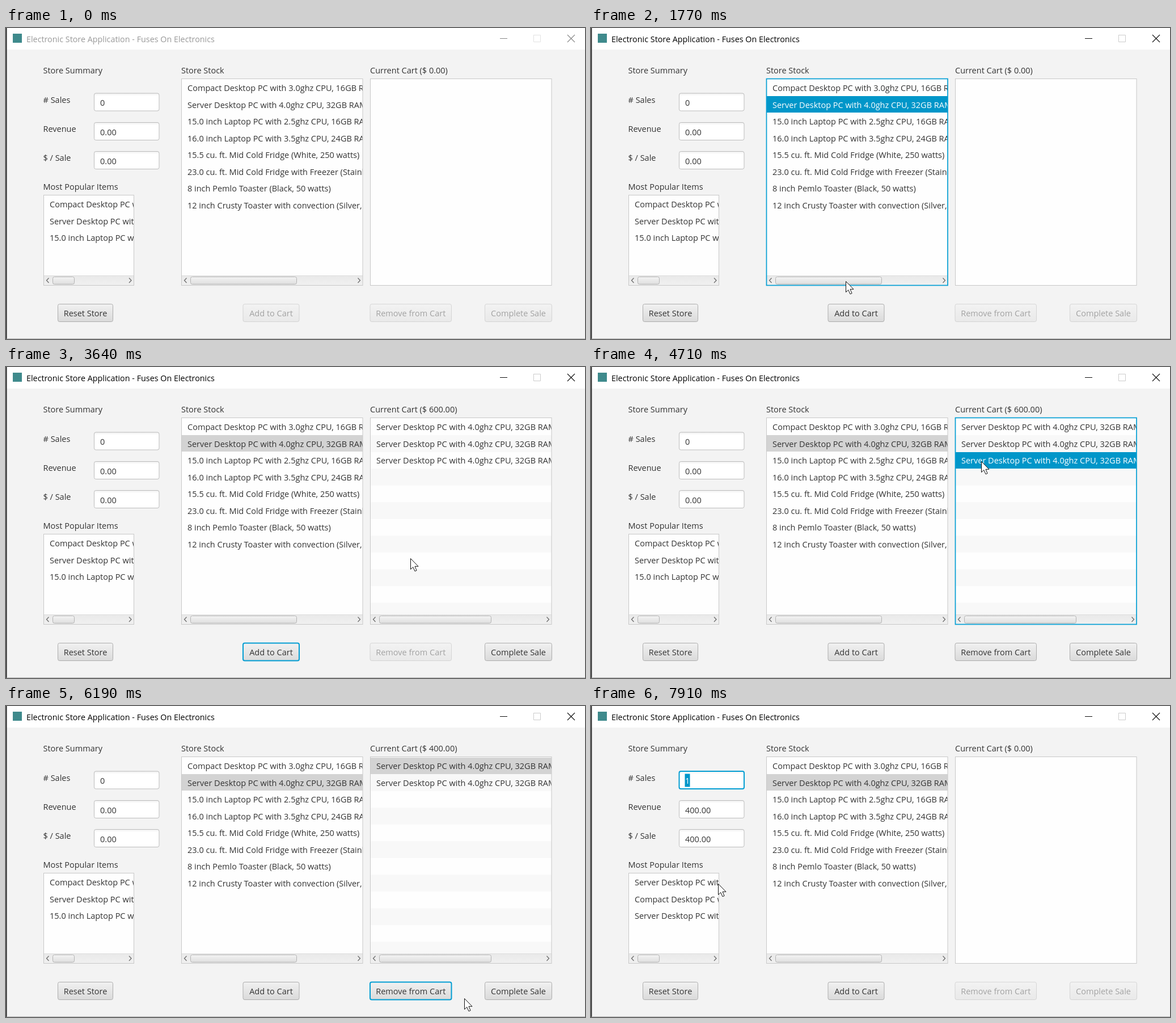
Recreate the animation shown at these times as an HTML page with a canvas. Size 1021 px wide and 548 px high, loop 7990 ms.

```html
<!DOCTYPE html>
<html lang="en">
<head>
<meta charset="utf-8">
<title>Electronic Store</title>
<style>
  html, body { margin: 0; width: 100%; height: 100%; overflow: hidden; background: #f3f3f3; }
  canvas { display: block; }
</style>
</head>
<body>
<canvas id="stage" width="1021" height="548"></canvas>
<script>
const ctx = document.getElementById('stage').getContext('2d');
const LOOP = 7990;
const FONT = '14.5px "Open Sans", "Noto Sans", sans-serif';
const TITLE_FONT = '14.35px "Open Sans", "Noto Sans", sans-serif';
const INK = '#333', BLUE = '#0096c9', FOCUS = '#039ed3';
const ROW = 29.52;

const COMPACT = 'Compact Desktop PC with 3.0ghz CPU, 16GB RAM';
const SERVER = 'Server Desktop PC with 4.0ghz CPU, 32GB RAM';
const LAPTOP = '15.0 inch Laptop PC with 2.5ghz CPU, 16GB RAM';
const STOCK = [
  COMPACT, SERVER, LAPTOP,
  '16.0 inch Laptop PC with 3.5ghz CPU, 24GB RAM',
  '15.5 cu. ft. Mid Cold Fridge (White, 250 watts)',
  '23.0 cu. ft. Mid Cold Fridge with Freezer (Stainless, 125 watts)',
  '8 inch Pemlo Toaster (Black, 50 watts)',
  '12 inch Crusty Toaster with convection (Silver, 50 watts)'
];

const BUTTONS = {
  reset: { label: 'Reset Store', x: 91.5, w: 97 },
  add: { label: 'Add to Cart', x: 418, w: 99 },
  remove: { label: 'Remove from Cart', x: 642, w: 143.5 },
  complete: { label: 'Complete Sale', x: 844.5, w: 118 }
};
const BUTTON_Y = 486.5, BUTTON_H = 31;

// Each entry: time, then the state it changes.
const EVENTS = [
  [1450, { active: true, stockRow: 1, focus: 'stock' }],
  [1530, { canAdd: true }],
  [2300, { focus: 'add', pressed: 'add' }],
  [2370, { pressed: null, items: 1 }],
  [2770, { pressed: 'add' }],
  [2850, { pressed: null, items: 2 }],
  [3320, { pressed: 'add' }],
  [3390, { pressed: null, items: 3 }],
  [4710, { focus: 'cart', cartRow: 2 }],
  [4790, { cartRow: 0 }],
  [5640, { focus: 'remove', pressed: 'remove' }],
  [5730, { pressed: null, items: 2 }],
  [6750, { focus: 'complete', pressed: 'complete' }],
  [6830, { pressed: null, items: 0, cartRow: -1, focus: 'sales', sold: true }]
];

// Pointer path: time, x, y.
const PATH = [
  [0, 515, 320], [200, 515, 320], [205, 468, 268], [360, 468, 268],
  [700, 452, 190], [950, 442, 145], [1210, 440, 131], [1530, 440, 131],
  [1680, 447, 392], [1755, 449, 446], [2220, 446, 497], [3390, 446, 497],
  [3620, 713, 338], [4080, 689, 190], [4140, 689, 190], [4300, 681, 178],
  [4470, 688, 166], [4860, 688, 166], [5100, 710, 290], [5300, 702, 450],
  [5480, 691, 495], [5800, 691, 495], [6080, 780, 520], [6425, 869, 503],
  [7135, 869, 503], [7290, 800, 482], [7480, 571, 378], [7560, 490, 330],
  [7720, 320, 268], [7890, 224, 313]
];

function stateAt(t) {
  const state = { active: false, stockRow: -1, cartRow: -1, focus: null, pressed: null, items: 0, sold: false };
  for (const [time, change] of EVENTS) if (t >= time) Object.assign(state, change);
  return state;
}

function pointerAt(t) {
  const step = 77.7, start = 205;
  const s = Math.max(0, start + Math.floor((t - start) / step) * step);
  const i = PATH.findIndex(p => p[0] > s);
  if (i < 0) return PATH[PATH.length - 1].slice(1);
  const [t0, x0, y0] = PATH[i - 1], [t1, x1, y1] = PATH[i];
  const k = (s - t0) / (t1 - t0);
  return [x0 + (x1 - x0) * k, y0 + (y1 - y0) * k].map(Math.round);
}

function text(str, x, y, color = INK, font = FONT) {
  ctx.font = font;
  ctx.fillStyle = color;
  ctx.fillText(str, x, y);
}

function fill(color, x, y, w, h) {
  ctx.fillStyle = color;
  ctx.fillRect(x, y, w, h);
}

function box(x, y, w, h, radius, background, border, line = 1) {
  ctx.beginPath();
  ctx.roundRect(x, y, w, h, radius);
  ctx.fillStyle = background;
  ctx.fill();
  ctx.strokeStyle = border;
  ctx.lineWidth = line;
  ctx.stroke();
}

function lines(color, width, ...paths) {
  ctx.strokeStyle = color;
  ctx.lineWidth = width;
  ctx.beginPath();
  for (const path of paths) path.forEach(([x, y], i) => i ? ctx.lineTo(x, y) : ctx.moveTo(x, y));
  ctx.stroke();
}

function shade(y, h, top, bottom) {
  const gradient = ctx.createLinearGradient(0, y, 0, y + h);
  gradient.addColorStop(0, top);
  gradient.addColorStop(1, bottom);
  return gradient;
}

function drawTitleBar(active) {
  fill('#fff', 0, 0, 1021, 38);
  fill('#3f8a8c', 12, 10, 16, 16);
  text('Electronic Store Application - Fuses On Electronics', 36, 24.5, active ? '#000' : '#999', TITLE_FONT);
  const color = active ? '#111' : '#888';
  lines(color, 1, [[871, 18.5], [884, 18.5]]);
  lines(active ? '#ccc' : '#e2e2e2', 1, [[930.5, 12.5], [942.5, 12.5], [942.5, 24.5], [930.5, 24.5], [930.5, 12]]);
  lines(color, 1.1, [[990, 12], [1003, 25]], [[1003, 12], [990, 25]]);
}

function drawField(y, value, focused) {
  box(155.5, y, 114.5, 31, 3, shade(y, 5, '#f0f0f0', '#fff'), focused ? FOCUS : '#bcbcbc', focused ? 2 : 1);
  if (focused) fill(BLUE, 165.5, y + 4.5, 9, 23);
  text(value, 166, y + 22, focused ? '#fff' : INK);
}

function drawScrollBar(x, w, thumb) {
  fill(shade(436, 17, '#e9e9e9', '#f0f0f0'), x, 436, w, 17);
  lines('#dcdcdc', 1, [[x, 436.5], [x + w, 436.5]]);
  const right = x + w;
  lines('#6e6e6e', 1.3,
    [[x + 9, 440.5], [x + 5, 444.7], [x + 9, 449]],
    [[right - 8.5, 440.5], [right - 4.5, 444.7], [right - 8.5, 449]]);
  box(x + 16, 438.5, thumb, 13, 3, shade(438, 13, '#f4f4f4', '#dfdfdf'), '#b2b2b2');
}

function drawList({ x, y, w, items, thumb, row = -1, focused = false, striped = false }) {
  const h = 453.5 - y;
  ctx.save();
  ctx.beginPath();
  ctx.rect(x, y, w, h);
  ctx.clip();
  fill('#fefefe', x, y, w, h);
  if (striped && items.length) {
    for (let i = 1; i < 12; i += 2) fill('#f8f8f8', x, y + 1.2 + i * ROW, w, ROW);
  }
  items.forEach((item, i) => {
    const selected = i === row;
    if (selected) fill(focused ? BLUE : '#d3d3d3', x, Math.round(y + 1.2 + i * ROW), w, 29);
    text(item, x + 10.5, y + 21.5 + i * ROW, selected && focused ? '#fff' : INK);
  });
  if (items.length) drawScrollBar(x, w, thumb);
  ctx.restore();
  ctx.strokeStyle = focused ? FOCUS : '#c8c8c8';
  ctx.lineWidth = focused ? 1.7 : 1;
  ctx.strokeRect(x, y, w, h);
}

function drawButton(name, enabled, state, [px, py]) {
  const { label, x, w } = BUTTONS[name];
  const hover = px >= x && px <= x + w && py >= BUTTON_Y && py <= BUTTON_Y + BUTTON_H;
  const focused = state.focus === name;
  const [top, bottom] = state.pressed === name ? ['#d6d6d6', '#c6c6c6']
    : hover ? ['#fbfbfb', '#e9e9e9'] : ['#f1f1f1', '#dadada'];
  ctx.globalAlpha = enabled ? 1 : 0.4;
  box(x, BUTTON_Y, w, BUTTON_H, 3, shade(BUTTON_Y, BUTTON_H, top, bottom),
    focused ? FOCUS : '#adadad', focused ? 2 : 1);
  ctx.textAlign = 'center';
  text(label, x + w / 2, 508);
  ctx.textAlign = 'left';
  ctx.globalAlpha = 1;
}

function drawPointer([x, y]) {
  ctx.save();
  ctx.translate(x + 0.5, y + 0.5);
  ctx.beginPath();
  for (const [px, py] of [[0, 0], [0, 19], [4.3, 15], [7.5, 22.3], [10.6, 21], [7.5, 13.8], [13.5, 13.8]]) ctx.lineTo(px, py);
  ctx.closePath();
  ctx.fillStyle = '#fff';
  ctx.fill();
  ctx.strokeStyle = '#111';
  ctx.lineWidth = 1;
  ctx.stroke();
  ctx.restore();
}

function draw(t) {
  const state = stateAt(t), pointer = pointerAt(t);
  const { items, sold, focus } = state;
  fill('#f3f3f3', 0, 0, 1021, 548);
  drawTitleBar(state.active);

  text('Store Summary', 65.5, 80);
  text('# Sales', 65.5, 131.5);
  text('Revenue', 65.5, 183);
  text('$ / Sale', 65.5, 234);
  text('Most Popular Items', 65.5, 285);
  text('Store Stock', 309, 80);
  text(`Current Cart ($ ${(items * 200).toFixed(2)})`, 642, 80);

  const money = sold ? '400.00' : '0.00';
  drawField(115, sold ? '1' : '0', focus === 'sales');
  drawField(166.5, money);
  drawField(217.5, money);

  drawList({ x: 66.5, y: 294.5, w: 159, thumb: 38, items: sold ? [SERVER, COMPACT, SERVER] : [COMPACT, SERVER, LAPTOP] });
  drawList({ x: 309.5, y: 89.5, w: 319.5, thumb: 187, items: STOCK, row: state.stockRow, focused: focus === 'stock' });
  drawList({ x: 642.5, y: 89.5, w: 319.5, thumb: 197, items: Array(items).fill(SERVER),
    row: state.cartRow, focused: focus === 'cart', striped: true });

  drawButton('reset', true, state, pointer);
  drawButton('add', state.canAdd, state, pointer);
  drawButton('remove', state.cartRow >= 0, state, pointer);
  drawButton('complete', items > 0, state, pointer);

  fill('#222', 0, 0, 1.5, 548);
  fill('#b4b4b4', 1, 547, 1020, 1);
  if (t >= 150) drawPointer(pointer);
}

const begin = performance.now();
function tick() {
  draw((performance.now() - begin) % LOOP);
  requestAnimationFrame(tick);
}
tick();
</script>
</body>
</html>
```
